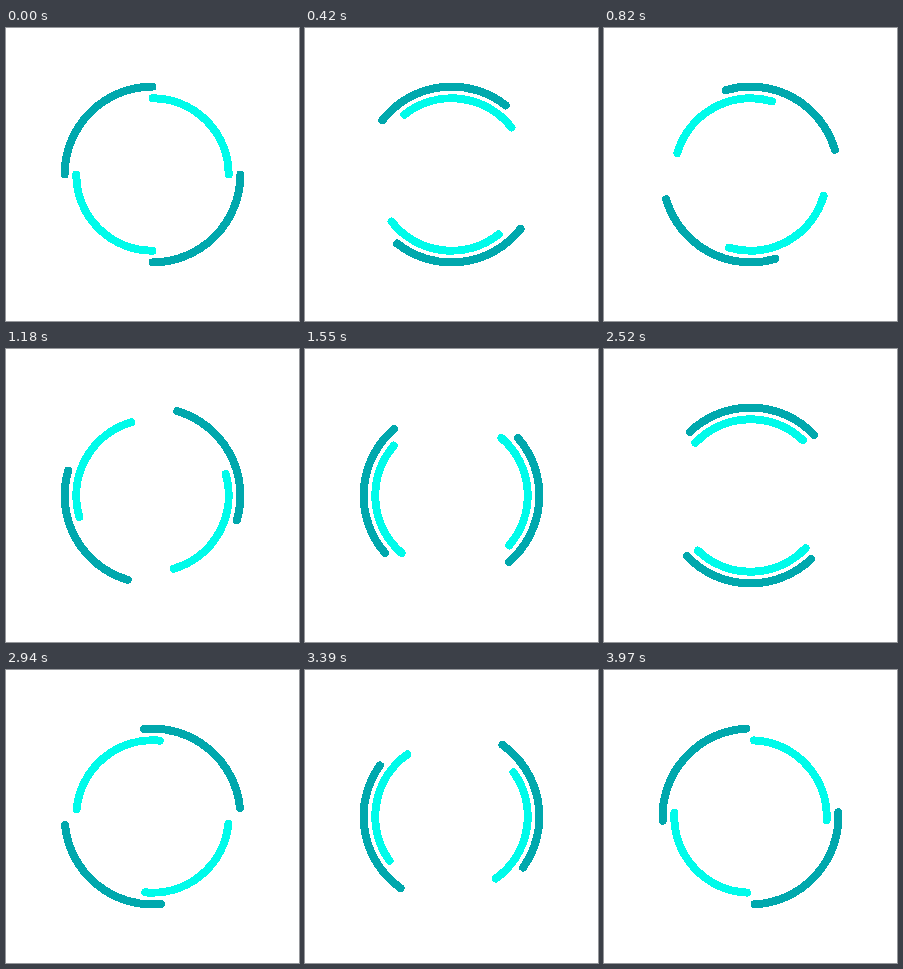
Recreate the animation shown at these times as an HTML page. Size 293x293 px, loop 4000 ms.

```html
<!DOCTYPE html>
<html lang="en">
<head>
<meta charset="utf-8">
<title>Double ring spinner</title>
<style>
  html, body { margin: 0; height: 100%; overflow: hidden; background: #fff; }
  svg { display: block; width: 100vw; height: 100vh; }
  path { fill: none; stroke-width: 8; stroke-linecap: round; }
</style>
</head>
<body>
<svg viewBox="-146.5 -146.5 293 293" shape-rendering="crispEdges">
  <path id="outer" stroke="#00a8ad"/>
  <path id="inner" stroke="#00fbea"/>
</svg>
<script>
const LOOP = 4000, STEPS = 132, TAU = 2 * Math.PI;
const outer = document.getElementById('outer');
const inner = document.getElementById('inner');

// Two opposite quarter arcs, the first starting at the given angle.
function arcs(radius, start) {
  const at = a => `${radius * Math.cos(a)} ${radius * Math.sin(a)}`;
  return [start, start + TAU / 2]
    .map(a => `M${at(a)}A${radius} ${radius} 0 0 1 ${at(a + TAU / 4)}`)
    .join('');
}

function draw(now) {
  // The rotation advances in even steps, timed to the nearest 10 ms.
  const t = Math.floor((now % LOOP) / 10) * 10 + 5;
  const turn = Math.floor(t * STEPS / LOOP) / STEPS * TAU;
  outer.setAttribute('d', arcs(87.9, turn));
  inner.setAttribute('d', arcs(76.2, -TAU / 4 - turn));
}

function tick() {
  draw(performance.now());
  requestAnimationFrame(tick);
}
tick();
</script>
</body>
</html>
```
